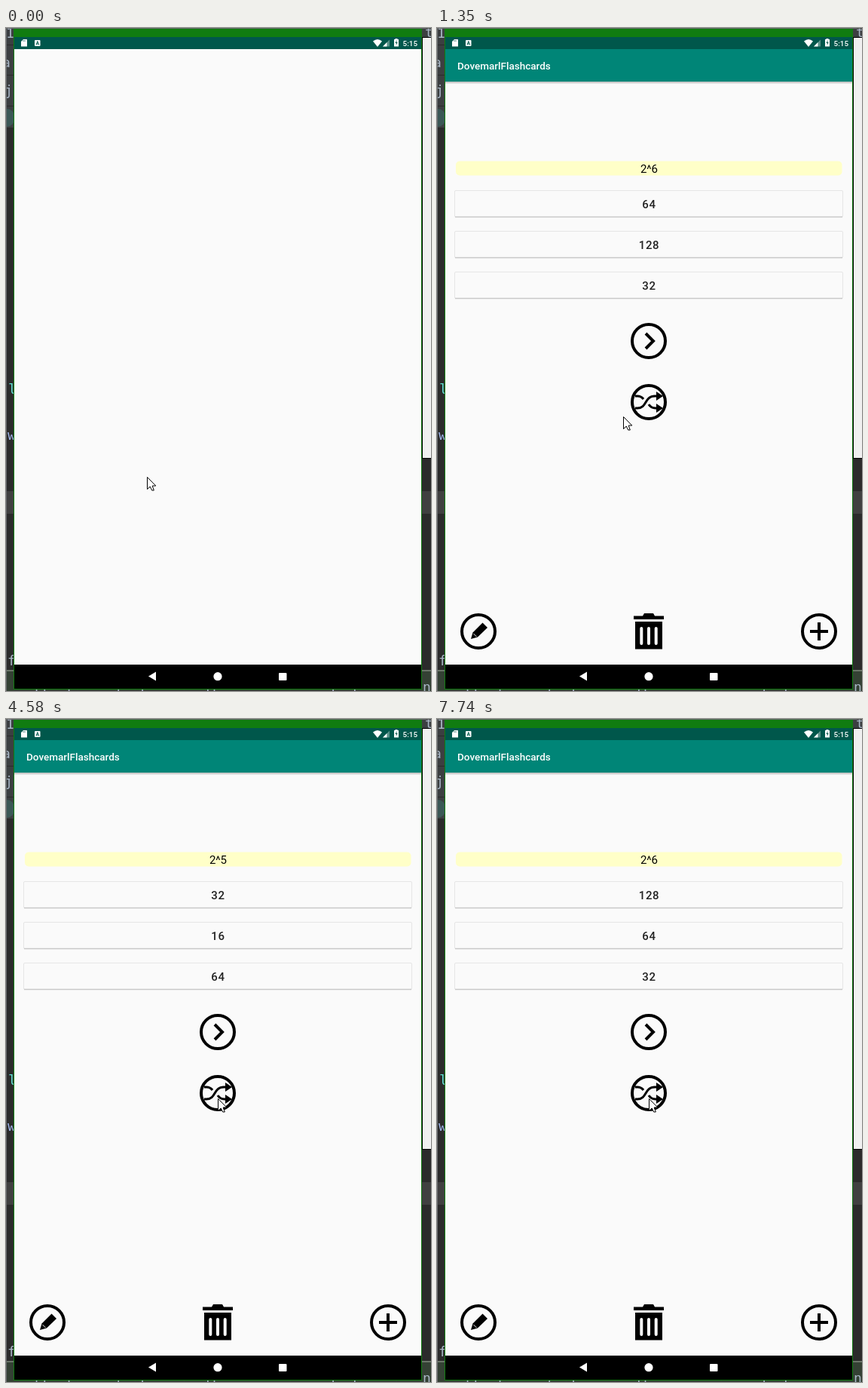
An HTML page for the animation above (8000 ms loop, 564x879 px).

```html
<!DOCTYPE html>
<html lang="en">
<head>
<meta charset="utf-8">
<title>Flashcards</title>
<style>
  html, body { margin: 0; width: 100%; height: 100%; overflow: hidden; background: #2b2b2b; }
  svg { display: block; width: 564px; height: 879px; }
  text { font-family: Roboto, sans-serif; }
  .code text { font: 18px "DejaVu Sans Mono", monospace; fill: #a9b7c6; }
  .answer { font-size: 15px; font-weight: 500; letter-spacing: .5px; fill: #000; fill-opacity: .87; }
  .line { fill: none; stroke: #000; stroke-width: 4; }
</style>
</head>
<body>
<svg viewBox="0 0 564 879">
  <defs>
    <clipPath id="leftStrip"><rect width="10" height="879"/></clipPath>
    <clipPath id="rightStrip"><rect x="552" width="12" height="879"/></clipPath>
    <clipPath id="bottomStrip"><rect x="10" y="877" width="542" height="2"/></clipPath>
    <linearGradient id="shade" x2="0" y2="1">
      <stop stop-opacity=".28"/><stop offset="1" stop-opacity="0"/>
    </linearGradient>
  </defs>

  <!-- Editor behind the emulator -->
  <rect width="564" height="879" fill="#2b2b2b"/>
  <rect width="564" height="132" fill="#3c3f41"/>
  <path d="M0 22.5H10M0 62.5H10M0 103.5H10" stroke="#2b2b2b"/>
  <rect y="132" width="564" height="482" fill="#2b2b2b"/>
  <rect x="-12" y="107" width="23" height="24" rx="10" fill="#3b5856"/>
  <rect y="614" width="564" height="30" fill="#404040"/>
  <rect y="852" width="564" height="27" fill="#344134"/>
  <path d="M0 852H564" stroke="#6a7568" stroke-width="2"/>
  <g class="code" clip-path="url(#leftStrip)">
    <text x="0" y="13">1</text>
    <text x="-5" y="52">a</text>
    <text x="-2" y="89">ja</text>
    <text x="3" y="485" style="fill:#5fe0d0">l</text>
    <text x="2" y="546" style="fill:#9fb4e8">w</text>
    <text x="2" y="845">f</text>
  </g>
  <g class="code" clip-path="url(#rightStrip)">
    <text x="556" y="12">t</text>
    <text x="553" y="880">n</text>
  </g>
  <rect x="552.5" y="12.5" width="14" height="558" fill="#f0f0f0" stroke="#000"/>
  <path d="M.5 0V879M0 .5H564" stroke="#66696b"/>

  <!-- Emulator frame -->
  <rect x="10" y="1" width="542" height="877" fill="#107c10"/>
  <g class="code" clip-path="url(#bottomStrip)">
    <rect y="877" width="564" height="2" fill="#344134"/>
    <text x="14" y="889">collection of items in the app using adapter view</text>
  </g>
  <rect x="11" y="12" width="540" height="16" fill="#00574b"/>
  <rect x="11" y="28" width="540" height="816" fill="#fafafa"/>
  <rect x="11" y="844" width="540" height="32" fill="#000"/>
  <g fill="#fff">
    <path d="M189 859.5L199 853.5V865.5Z"/>
    <circle cx="281" cy="859.7" r="5.6"/>
    <rect x="362" y="855" width="10.5" height="10" rx="1"/>
    <path d="M23 15H27.500Q28 15 28 16V24.500H20V18Z"/>
    <rect x="38" y="16" width="7.500" height="8" rx="1"/>
    <path d="M487 17.500Q493 12.500 499 17.500L493 25Z"/>
    <path d="M509 15.500V24.500H500Z" opacity=".35"/>
    <path d="M505.500 19V24.500H500Z"/>
    <path d="M516.500 15V14H519.500V15H521V24.500H515V15Z"/>
    <text x="526.600" y="23.500" font-size="9.900" font-weight="500">5:15</text>
  </g>
  <path d="M23 16V18M25 16V18" stroke="#00574b" stroke-width=".7"/>
  <path d="M40 22.500L41.800 17.500L43.600 22.500M40.600 21H43" fill="none" stroke="#00574b"/>
  <path d="M518.600 16L516.500 20H518L517.600 23L519.700 19H518.300Z" fill="#00574b"/>

  <!-- App content -->
  <g id="content">
    <rect x="11" y="71" width="540" height="3.500" fill="url(#shade)"/>
    <rect x="11" y="28" width="540" height="43" fill="#008577"/>
    <text x="27" y="55.300" font-size="13.500" font-weight="500" fill="#fff">DovemarlFlashcards</text>
    <rect x="25" y="176.500" width="512.500" height="19" rx="5" fill="#ffffc8"/>
    <text id="question" x="281.500" y="191.800" font-size="15" text-anchor="middle"></text>
    <g id="answers"></g>

    <g class="line">
      <circle cx="281" cy="415" r="22"/>
      <path d="M277 405L287 415L277 425"/>
      <circle cx="281" cy="496" r="22"/>
      <circle cx="55" cy="800" r="22"/>
      <circle cx="507" cy="800" r="22"/>
      <path d="M495 800H519M507 788V812"/>
    </g>
    <g class="line" style="stroke-width:3">
      <path d="M263 504H266C279 504 275 488 289 488H292"/>
      <path d="M263 488H266Q271 488 274 492M281 499Q284 504 290 504H292"/>
    </g>
    <path d="M291 482L300 488L291 494ZM291 498L300 504L291 510Z"/>
    <path d="M45 810L47.500 801.500L60.500 788.500L67 795L54 807.500Z"/>
    <path d="M48.500 803L52.500 807" stroke="#fafafa"/>
    <path d="M261 784V779.500H273L275 776H287L289 779.500H301V784ZM263 787H299V823.500H263Z"/>
    <path d="M271.300 796V816M281 796V816M290.700 796V816" stroke="#fafafa" stroke-width="4" stroke-linecap="round"/>
  </g>

  <g id="pointer">
    <circle id="ring" cx="1.500" cy="1.500" r="9.700" fill="#fff" fill-opacity=".65" stroke="#222"/>
    <path d="M.5 .5V16.500L4.200 13L6.700 18H9.300L7.200 12H11.800Z" fill="#fff" stroke="#000"/>
  </g>
</svg>

<script>
const LOOP = 8000;
const byId = id => document.getElementById(id);

// [time, question, answers]
const cards = [
  [0, '2^6', [64, 128, 32]],
  [3570, '13^2', [169, 156, 196]],
  [4090, '2^4', [16, 24, 32]],
  [4580, '2^5', [32, 16, 64]],
  [5010, '13^2', [196, 156, 169]],
  [5500, '13^2', [169, 196, 156]],
  [5930, '2^5', [16, 32, 64]],
  [6410, '13^2', [156, 169, 196]],
  [6840, '2^5', [64, 16, 32]],
  [7320, '2^5', [32, 64, 16]],
  [7740, '2^6', [128, 64, 32]],
];

// Mouse button [down, up]
const presses = [
  [1020, 1170], [3450, 3510], [3880, 4040], [4400, 4520], [4820, 5010], [5260, 5440],
  [5740, 5930], [6240, 6350], [6660, 6780], [7080, 7270], [7570, 7680],
];

// Pointer tip [time, x, y]
const path = [
  [1350, 247, 515], [1500, 283, 472], [1680, 316, 433], [1900, 300, 462], [2120, 270, 505],
  [2350, 264, 523], [2590, 262, 533], [2720, 265, 537], [2960, 275, 513], [3080, 281, 503],
];
const POINTER_STEP = 64.4;

const answerTexts = [215, 269, 323].map(y => {
  byId('answers').insertAdjacentHTML('beforeend', `
    <rect x="23.500" y="${y + .5}" width="515" height="35" rx="1.500" fill="#fafafa" stroke="#e6e6e6"/>
    <path d="M24 ${y + 35.500}H538" stroke="#c8c8c8" stroke-width="1.500"/>
    <text class="answer" x="281.400" y="${y + 24}" text-anchor="middle"></text>`);
  return byId('answers').lastElementChild;
});

function pointerAt(time) {
  if (time < path[0][0]) return [187, 595];
  const start = path[0][0];
  const t = time >= 3080 ? 3080 : start + Math.floor((time - start) / POINTER_STEP) * POINTER_STEP;
  const i = Math.max(1, path.findIndex(p => p[0] >= t));
  const [a, b] = [path[i - 1], path[i]];
  const k = (t - a[0]) / (b[0] - a[0]);
  return [1, 2].map(n => Math.round(a[n] + (b[n] - a[n]) * k));
}

function render(time) {
  const [, question, answers] = cards.findLast(card => card[0] <= time);
  byId('question').textContent = question;
  answerTexts.forEach((text, i) => { text.textContent = answers[i]; });

  const opacity = time < 280 ? 0 : time < 350 ? .45 : time < 450 ? .856 : 1;
  byId('content').setAttribute('opacity', opacity);

  byId('pointer').setAttribute('transform', `translate(${pointerAt(time)})`);
  const pressed = presses.some(([down, up]) => time >= down && time < up);
  byId('ring').setAttribute('visibility', pressed ? 'visible' : 'hidden');
}

const startTime = performance.now();
function tick() {
  render((performance.now() - startTime) % LOOP);
  requestAnimationFrame(tick);
}
render(0);
requestAnimationFrame(tick);
</script>
</body>
</html>
```
